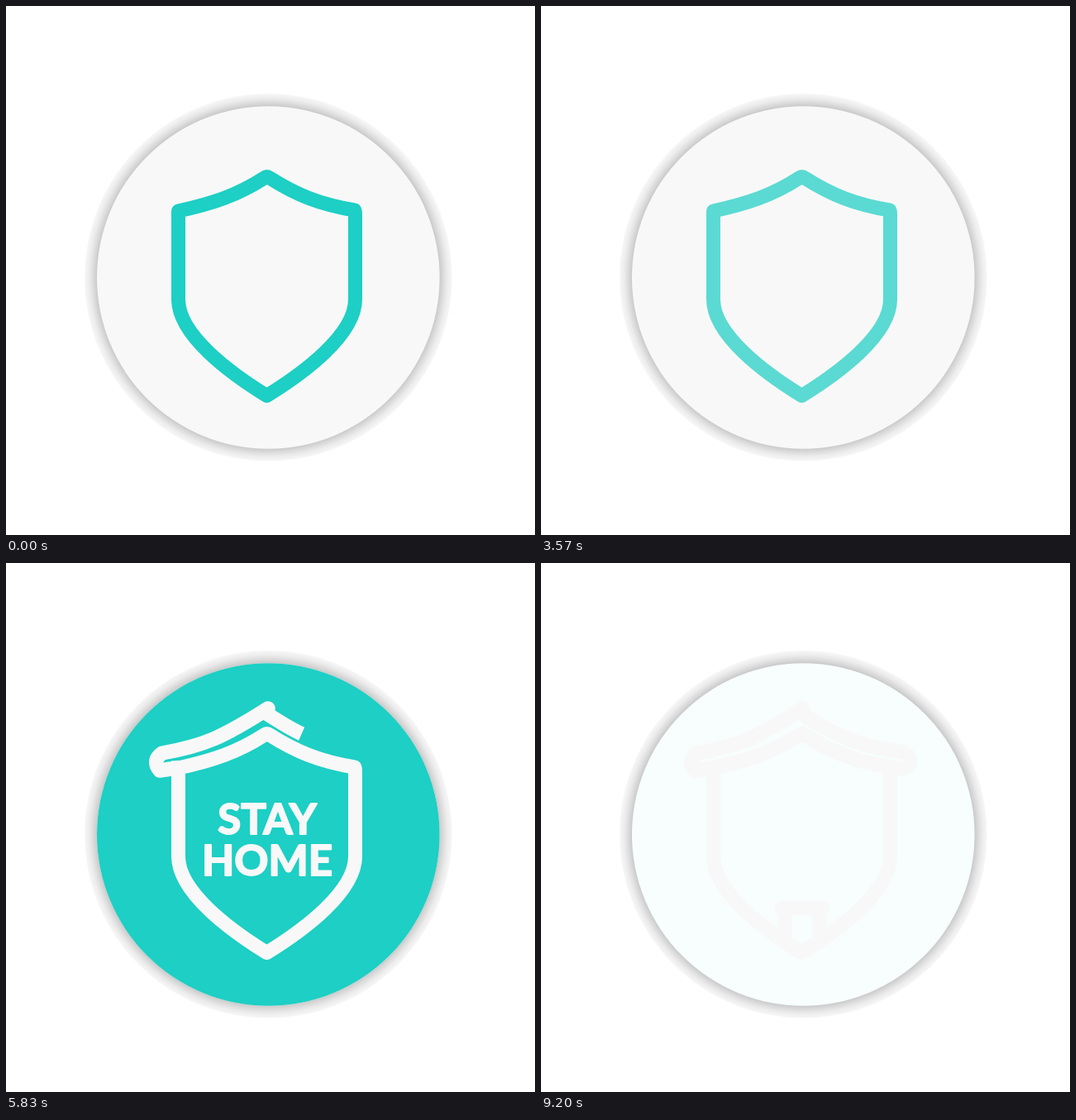
Write an HTML page with a canvas that moves like this. It is 640 px wide and 640 px high and loops after 9.23 s.

```html
<!DOCTYPE html>
<html lang="en">
<head>
<meta charset="utf-8">
<title>Stay safe, stay home</title>
<style>
html, body { margin: 0; width: 100%; height: 100%; overflow: hidden; background: #fff; }
canvas { display: block; }
</style>
</head>
<body>
<canvas id="stage" width="640" height="640"></canvas>
<script>
const ctx = document.getElementById('stage').getContext('2d');
const LOOP = 9230;
const TEAL = '#1dcfc4', LIGHT = '#f8f8f8';
const CX = 317.3, CY = 328.5, R = 207.3;

// A stroke that can be drawn on from its start
function makeLine(d) {
  const el = document.createElementNS('http://www.w3.org/2000/svg', 'path');
  el.setAttribute('d', d);
  return { path: new Path2D(d), length: el.getTotalLength() };
}

const TOP = 'C380 240 352 229 319 208 Q315.7 205.5 312.5 208 C280 229 250 239 208.5 248';
const shield = makeLine('M208.5 248 V355 C208.5 398 271 444 315.5 471.5 ' +
  'C360 444 422.5 398 422.5 355 V253 Q422.5 247 421.5 247 ' + TOP + 'Z');
const openShield = makeLine('M208.5 239.5 V355 C208.5 398 271 444 315.5 471.5 ' +
  'C360 444 422.5 398 422.5 355 V253 Q422.5 247 421.5 247 ' + TOP);
const roof = makeLine('M210 247.5 L186 251 Q176 239 189 230 C240 221 262 211 317 176 ' +
  'L315 182 C340 198 352 205 366 210 C385 220 410 225 438 229 ' +
  'Q450 235 445 244 Q441 251 422.5 247 ' + TOP);
const door = makeLine('M295.5 456 V417.5 H291 H341 H336.5 V456');

const clamp = x => Math.max(0, Math.min(1, x));
const linear = (t, start, span) => clamp((t - start) / span);
const ease = (t, start, span) => {
  const u = linear(t, start, span);
  return u * u * (3 - 2 * u);
};
const easeOut = (t, start, span) => 1 - Math.pow(1 - linear(t, start, span), 3);

function drawLine(line, color, part = 1, width = 17) {
  if (part <= 0) return;
  ctx.strokeStyle = color;
  ctx.lineWidth = width;
  ctx.lineJoin = 'round';
  ctx.setLineDash(part < 1 ? [line.length * part, line.length * 2] : []);
  ctx.stroke(line.path);
  ctx.setLineDash([]);
}

function disc(color, alpha = 1) {
  ctx.globalAlpha = alpha;
  ctx.fillStyle = color;
  ctx.beginPath();
  ctx.arc(CX, CY, R, 0, Math.PI * 2);
  ctx.fill();
  ctx.globalAlpha = 1;
}

const glow = ctx.createRadialGradient(CX, 328.3, R - 1, CX, 328.3, 222.3);
glow.addColorStop(0, '#c6c6c6');
glow.addColorStop(0.3, '#d9d9d9');
glow.addColorStop(0.65, '#ececec');
glow.addColorStop(1, '#f7f7f7');

function shadow() {
  ctx.fillStyle = glow;
  ctx.beginPath();
  ctx.arc(CX, 328.3, 222.3, 0, Math.PI * 2);
  ctx.fill();
}

// Two lines of text, visible only between the sides of the shield
function label(second, x, color) {
  ctx.save();
  ctx.beginPath();
  ctx.rect(216, 280, 199, 110);
  ctx.clip();
  ctx.font = '700 51px Lato, "Open Sans", sans-serif';
  ctx.textAlign = 'center';
  ctx.fillStyle = ctx.strokeStyle = color;
  ctx.lineWidth = 2;
  ctx.lineJoin = 'round';
  [['STAY', 328], [second, 377.5]].forEach(([word, y]) => {
    ctx.fillText(word, x, y);
    ctx.strokeText(word, x, y);
  });
  ctx.restore();
}

const slide = (t, inAt, outAt) =>
  -182 * (1 - ease(t, inAt, 1000)) + 190 * ease(t, outAt, 1000);

function lightScene(t) {
  disc(LIGHT);
  ctx.globalAlpha = 1 - linear(t, 3500, 250);
  drawLine(shield, TEAL);
  ctx.globalAlpha = 1;
  label('SAFE', 318.5 + slide(t, 0, 2765), TEAL);
}

function tealScene(t) {
  disc(t < 5600 ? LIGHT : '#fff');
  disc(TEAL, easeOut(t, 3700, 1900) * (1 - linear(t, 8300, 935)));
  drawLine(openShield, LIGHT, ease(t, 3720, 1000));
  drawLine(roof, LIGHT, ease(t, 5560, 620), 17.5);
  drawLine(door, LIGHT, ease(t, 6200, 960));
  label('HOME', 316 + slide(t, 3725, 7235), LIGHT);
}

function frame(now) {
  const t = now % LOOP;
  ctx.fillStyle = '#fff';
  ctx.fillRect(0, 0, 640, 640);
  shadow();
  (t < 3720 ? lightScene : tealScene)(t);
  requestAnimationFrame(frame);
}
requestAnimationFrame(frame);
</script>
</body>
</html>
```
